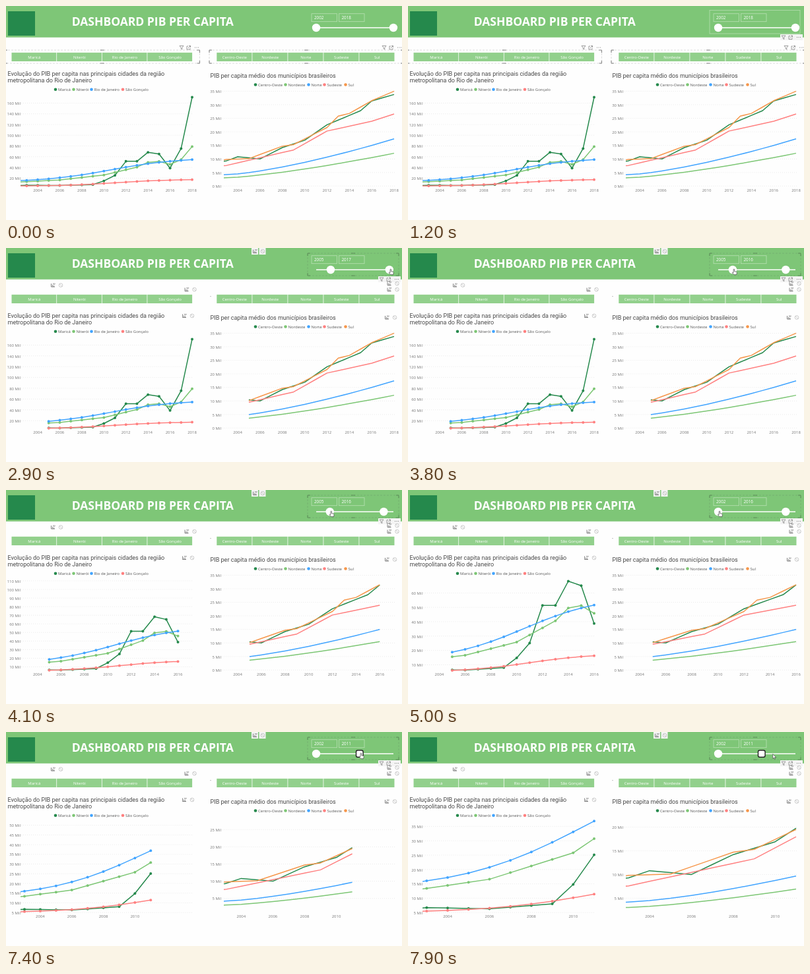
An HTML page for the animation above (8000 ms loop, 600 px wide and 325 px high).

```html
<!DOCTYPE html>
<html lang="pt">
<head>
<meta charset="utf-8">
<title>Dashboard PIB per capita</title>
<style>
html, body { margin: 0; width: 100%; height: 100%; overflow: hidden; background: #fff; }
svg { display: block; width: 600px; height: 325px; font-family: "Open Sans", "Noto Sans", sans-serif; font-size: 6px; }
.title { font: 9px Roboto, sans-serif; fill: #484848; }
#slider { font-size: 6.3px; }
</style>
</head>
<body>
<svg viewBox="0 0 600 325" xmlns="http://www.w3.org/2000/svg">
  <defs>
    <clipPath id="clipL"><rect x="22" y="110" width="264" height="175"/></clipPath>
    <clipPath id="clipR"><rect x="330" y="110" width="262" height="175"/></clipPath>
  </defs>
  <rect width="600" height="325" fill="#fefefe"/>
  <rect width="600" height="47.7" fill="#7ec677"/>
  <rect x="3" y="8" width="41" height="37" fill="#25894c"/>
  <text x="99.7" y="30.4" font-size="17.5" font-weight="700" fill="#fff">DASHBOARD PIB PER CAPITA</text>
  <g class="title">
    <text x="2.5" y="106">Evolução do PIB per capita nas principais cidades da região</text>
    <text x="2.5" y="115.5">metropolitana do Rio de Janeiro</text>
    <text x="309.6" y="108.5">PIB per capita médio dos municípios brasileiros</text>
  </g>
  <g id="fixed"></g>
  <g id="charts"></g>
  <g id="idle"></g>
  <g id="hover"></g>
  <g id="edit"></g>
  <g id="slider"></g>
  <g id="cursor"></g>
</svg>
<script>
const LOOP = 8000;
const $ = id => document.getElementById(id);
const GREEN = '#25894c', LIME = '#7cc674', BLUE = '#41a4ff', PINK = '#ff8080', ORANGE = '#f6964a';

const mix = (a, b, p) => a + (b - a) * p;
const clamp = p => Math.min(1, Math.max(0, p));
const ease = p => p * p * (3 - 2 * p);
const n = v => v.toFixed(2);

// Value at x between [x, value] keys
function between(keys, x, curve = p => p) {
  let i = 0;
  while (i < keys.length - 2 && keys[i + 1][0] <= x) i++;
  const [a, b] = [keys[i], keys[i + 1]];
  return mix(a[1], b[1], curve(clamp((x - a[0]) / (b[0] - a[0]))));
}

// Series shapes; y counts years from 2000, values in thousands
const points = (...keys) => y => between(keys, y);
const power = (from, to, e) => y => mix(from, to, clamp((y - 3) / 15) ** e);
const logistic = (low, rise, mid, width) => y => low + rise / (1 + Math.exp((mid - y) / width));

const cities = [
  ['Maricá', GREEN, 75, points([3, 6.7], [6, 6.3], [9, 8], [10, 14.8], [11, 25.1], [12, 51.4], [13, 51.4],
    [14, 68.2], [15, 65.1], [16, 38.7], [17, 75.3], [18, 171])],
  ['Niterói', LIME, 102.5, points([3, 13.4], [6, 16.6], [10, 25.8], [13, 40.6], [14, 49.5], [15, 51.2],
    [16, 45.8], [17, 54.6], [18, 79])],
  ['Rio de Janeiro', BLUE, 129.5, logistic(12.7, 45.3, 10.6, 3)],
  ['São Gonçalo', PINK, 177, logistic(5, 12.8, 11, 2.5)]
];
const regions = [
  ['Centro-Oeste', GREEN, 378, points([3, 9.3], [4, 10.8], [6, 10], [8, 14.2], [10, 16.9], [12, 22.6],
    [15, 27.8], [16, 31.4], [18, 33.8])],
  ['Nordeste', LIME, 423.5, power(3.05, 12.1, 1.35)],
  ['Norte', BLUE, 458.5, power(4.2, 17.4, 1.4)],
  ['Sudeste', PINK, 482.5, points([3, 7.6], [9, 13.3], [12, 20.3], [16, 23.9], [18, 26.6])],
  ['Sul', ORANGE, 514.5, points([3, 9.8], [5, 10.1], [8, 14.7], [9, 15.3], [12, 21.6], [13, 25.8],
    [14, 26.8], [16, 31.5], [18, 35])]
];

// Axis: x of 2004, x per year, y of zero, y per thousand
const axis = (x4, end, hi, y0, k) => [x4, (end - x4) / (hi - 4), y0, k];
const left = (x4, hi, y0, k) => axis(x4, 282, hi, y0, k);
const right = (hi, x4 = 351, y0 = 273.4, k = 4.114) => axis(x4, 588, hi, y0, k);
const views = [
  { t: 0, lo: 2, hi: 18, step: 20, L: left(48, 18, 277.7, .814), R: right(18) },
  { t: 2500, lo: 5, hi: 18, step: 20, L: left(48, 18, 278.6, .82), R: right(18) },
  { t: 4000, lo: 5, hi: 16, step: 10, L: left(47.4, 16, 287.2, 2.18), R: right(16) },
  { t: 5300, lo: 2, hi: 16, step: 10, L: left(47.4, 16, 285, 2.16), R: right(16) },
  { t: 7300, lo: 2, hi: 11, step: 5, L: left(60, 11, 296, 4.36), R: right(11, 366, 288.4, 7.2) }
];

const minKeys = [[1450, 2], [1900, 5], [4000, 5], [4700, 2]];
const maxKeys = [[2700, 18], [3150, 16], [6700, 16], [7100, 11]];
// 0: pointer on the lower handle, 1: on the upper one
const gripKeys = [[1900, 0], [2500, 1], [3200, 1], [3700, 0], [5200, 0], [6200, 1]];

const text = (x, y, s, fill, anchor = 'start') =>
  `<text x="${n(x)}" y="${n(y)}" fill="${fill}" text-anchor="${anchor}">${s}</text>`;
const box = (x, y, w, h, attrs) => `<rect x="${n(x)}" y="${n(y)}" width="${w}" height="${h}" ${attrs}/>`;
const dot = (x, y, r, fill) => `<circle cx="${n(x)}" cy="${n(y)}" r="${r}" fill="${fill}"/>`;
const stroke = (d, color, w = .8, extra = '') =>
  `<path d="${d}" fill="none" stroke="${color}" stroke-width="${w}" ${extra}/>`;

const legend = (list, y) => list.map(([name, color, x]) =>
  dot(x, y, 2.3, color) + text(x + 4, y + 2.2, name, '#555')).join('');

const buttons = (list, x, w) => list.map(([name], i) =>
  box(x + i * w, 70.8, w - .8, 13.2, 'fill="#92d08c"') +
  text(x + (i + .5) * w, 79.6, name, '#fff', 'middle')).join('');

// Filter, focus and menu icons
function tools(x, y) {
  const c = '#777';
  return stroke(`M${x - 3} ${y - 2.5}h6l-2.2 2.8v2.7l-1.6-1v-1.7z`, c, .7) +
    stroke(`M${x + 10} ${y - 2}h-2v5h5v-2M${x + 10} ${y + 1}l3.5-3.5h-2.5m2.5 0v2.5`, c, .7) +
    [20.5, 23, 25.5].map(d => dot(x + d, y, .6, c)).join('');
}

// Chart filter and "none" icons
function links(x, y) {
  return stroke(`M${x - 2.5} ${y + 2.5}v-5m2 5v-3m2 3v-2m1.5 2h-5.5`, '#666', .8) +
    stroke(`M${x} ${y - 2.5}h3.5l-1.7 2z`, '#666', .5) +
    `<circle cx="${x + 12}" cy="${y}" r="2.8" fill="none" stroke="#aaa" stroke-width=".6"/>` +
    stroke(`M${x + 10} ${y - 2}l4 4`, '#aaa', .6);
}

// Dashed selection with corner and middle handles
function selection(x, y, w, h, line, mark) {
  const r = x + w, b = y + h, m = x + w / 2;
  return box(x, y, w, h, `fill="none" stroke="${line}" stroke-width=".7" stroke-dasharray="3 2"`) +
    stroke(`M${x} ${y + 4}v-4h4M${r - 4} ${y}h4v4M${r} ${b - 4}v4h-4M${x + 4} ${b}h-4v-4M${m - 3} ${y}h6M${m - 3} ${b}h6`, mark, .9);
}

const paper = 'fill="#f4f4f4"';
const sliderTools = box(564, 43, 34, 9, paper) + tools(569, 47.5);
$('fixed').innerHTML = buttons(cities, 8.5, 68.6) + buttons(regions, 319.3, 54) +
  legend(cities, 126.7) + legend(regions, 119.5);
$('idle').innerHTML = selection(-2, 67, 295.5, 20, '#ccc', '#777') + selection(308, 67, 294, 20, '#ccc', '#777') +
  tools(266, 63) + tools(573, 63);
$('hover').innerHTML = box(457, 6.5, 137, 35.5, 'fill="none" stroke="#b4deaf" stroke-width=".8"') + sliderTools;
$('edit').innerHTML = selection(457, 8, 138, 34, '#72ab6d', '#5a8a56') + sliderTools +
  box(372, 0, 10, 10, paper) + box(383.5, 0, 10, 10, paper) +
  [[377, 5], [71, 56.5], [273.5, 63], [270, 103], [577, 105.5], [580.5, 54], [580.5, 63]].map(p => links(...p)).join('') +
  dot(310, 73.5, .7, '#aaa');

function chart(list, [x4, kx, y0, ky], v, o) {
  const X = y => x4 + (y - 4) * kx, Y = val => y0 - val * ky;
  let s = '';
  for (let val = 0; val <= 200; val += o.step) {
    const y = Y(val);
    if (y < o.top || y > 276) continue;
    s += stroke(`M${o.left} ${n(y)}H${o.right}`, '#e4e4e4', .7, 'stroke-dasharray="1 2"') +
      text(o.left - 1, y + 2.7, val + ' Mil', '#777', 'end');
  }
  for (let y = 4; y <= v.hi; y += 2) s += text(X(y), 282, 2000 + y, '#777', 'middle');
  s += `<g clip-path="url(#${o.clip})">`;
  for (const [, color, , value] of list) {
    const pts = [];
    // Before 2003 every line enters slightly lower
    for (let y = v.lo; y <= v.hi; y++) pts.push([X(y), Y(y < 3 ? value(3) * .94 : value(y))]);
    s += stroke('M' + pts.map(p => p.map(n).join(' ')).join('L'), color, 1.5, 'stroke-linejoin="round"');
    if (o.dots) s += pts.filter(p => p[0] > 24).map(p => dot(...p, 2, color)).join('');
  }
  return s + '</g>';
}

function drawCharts(t) {
  let i = views.length - 1;
  while (views[i].t > t) i--;
  const v = views[i], old = views[Math.max(0, i - 1)];
  const p = ease(clamp((t - v.t) / 250));
  const blend = side => v[side].map((b, j) => mix(old[side][j], b, p));
  $('charts').innerHTML =
    chart(cities, blend('L'), v, { step: v.step, top: 136.5, left: 23, right: 283, clip: 'clipL', dots: true }) +
    chart(regions, blend('R'), v, { step: 5, top: 128, left: 327, right: 590, clip: 'clipR' });
}

function drawSlider(t) {
  const years = [minKeys, maxKeys].map(keys => between(keys, t, ease));
  const [a, b] = years.map(y => 470 + (y - 2) * 7.31);
  const y = 33;
  let s = stroke(`M470 ${y}H587`, '#fff', 1.5) + dot(a, y, 6.2, '#fff');
  years.forEach((year, i) => {
    const x = 463 + i * 41.5;
    s += box(x, 11.7, 38.5, 12, 'fill="none" stroke="#b9e0b4" stroke-width=".8"') +
      text(x + 4, 19.7, 2000 + Math.round(year), '#fff');
  });
  s += t > 6700
    ? box(b - 5.3, y - 5.3, 10.6, 10.6, 'rx="2.5" fill="#fff" stroke="#222" stroke-width="1.4"')
    : dot(b, y, 6.2, '#fff');
  $('slider').innerHTML = s;

  const away = ease(clamp((t - 7500) / 350));
  const mx = mix(a, b, between(gripKeys, t, ease)) + 2 + 16 * away;
  const near = Math.min(Math.abs(mx - a), Math.abs(mx - b)) < 7;
  const shape = near
    ? 'M-.8 -3.5q.8-1 1.6 0v3l3 .7q.8.3.6 1.3l-.6 3h-4l-2.4-3q0-1.2 1.8 0z'
    : 'M-1-2.5v7l1.7-1.5 1 2.3 1.1-.5-1-2.2h2.2z';
  $('cursor').innerHTML = t < 1250 ? '' :
    `<path transform="translate(${n(mx)} 36)" d="${shape}" fill="#fff" stroke="#444" stroke-width=".7"/>`;
}

const show = (id, on) => $(id).setAttribute('visibility', on ? 'visible' : 'hidden');

function draw(t) {
  show('idle', t < 1500);
  show('hover', t >= 1000 && t < 1500);
  show('edit', t >= 1500);
  drawCharts(t);
  drawSlider(t);
}

const start = performance.now();
function loop(now) {
  draw(Math.max(0, now - start) % LOOP);
  requestAnimationFrame(loop);
}
draw(0);
requestAnimationFrame(loop);
</script>
</body>
</html>
```
